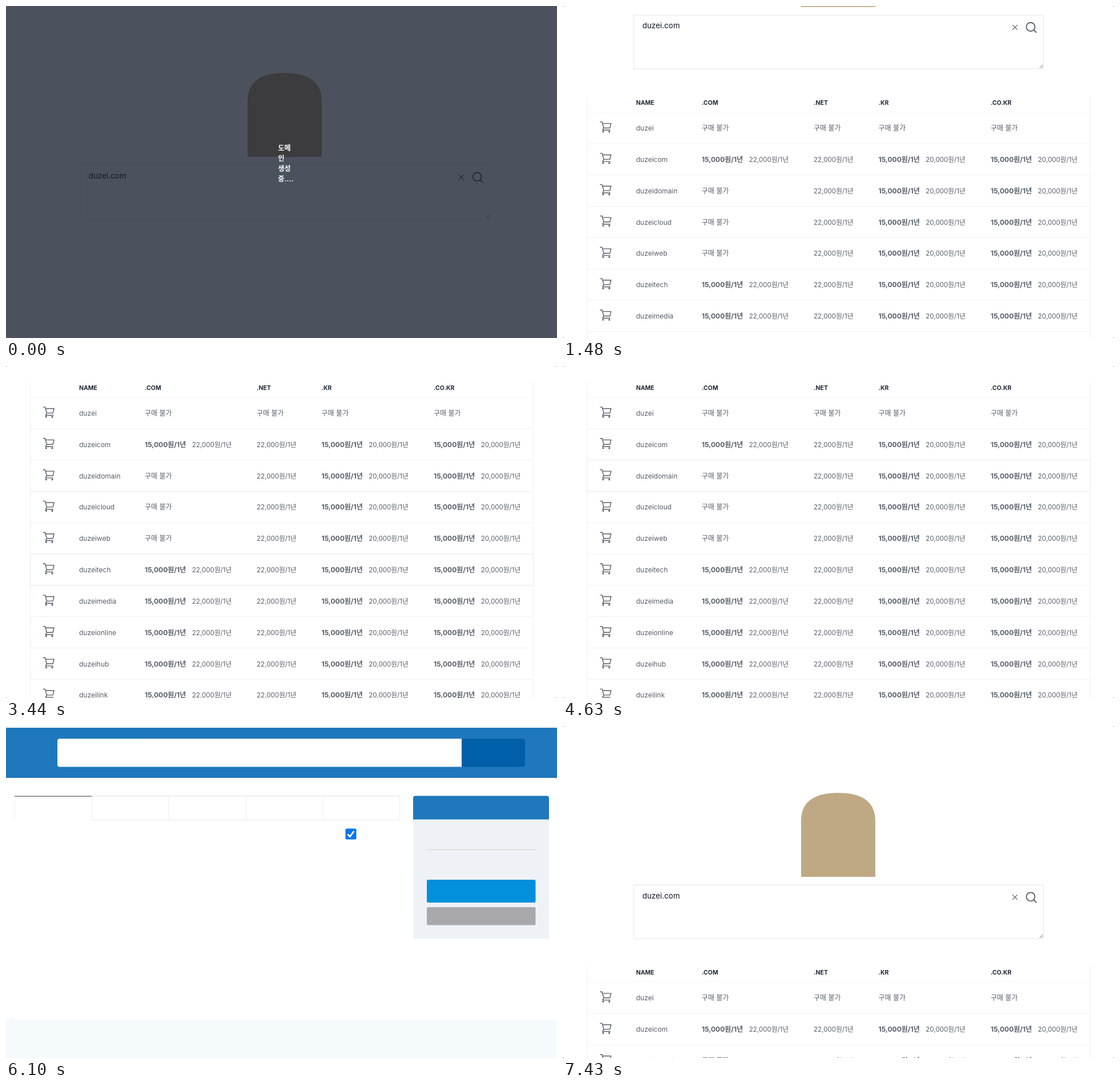
An HTML page that plays this animation: 965 by 581 pixels, repeating every 8 s.

```html
<!DOCTYPE html>
<html lang="ko">
<head>
<meta charset="utf-8">
<style>
  html, body { margin: 0; width: 100%; height: 100%; overflow: hidden; background: #333; }
  svg { display: block; width: 965px; height: 581px; }
  text { font: 12px Inter, "Noto Sans CJK KR", "Noto Sans CJK", sans-serif; fill: #585e6a; white-space: pre; }
  .price { font-size: 11.6px; }
  .sale { font-weight: 700; }
  .head { font-size: 10.5px; font-weight: 700; fill: #1f2937; }
  .query { font-size: 13.4px; fill: #111827; }
  .wait { font-weight: 700; fill: #fff; }
  .icon { fill: none; stroke: #565c68; stroke-linecap: round; stroke-linejoin: round; }
  .rule { fill: none; stroke: #eff0f2; }
</style>
</head>
<body>
<svg viewBox="0 0 965 581">
  <defs>
    <clipPath id="window"><rect width="965" height="581" rx="2"/></clipPath>
    <g id="cart" class="icon" stroke-width="1.4">
      <path d="M0 1H3.2L6 11.5L4 15.3H17.2M3.8 3.6H18.8L16.8 11.5H6"/>
      <circle cx="5" cy="18" r=".9"/><circle cx="15.7" cy="18" r=".9"/>
    </g>
  </defs>
  <g clip-path="url(#window)">
    <rect width="965" height="581" fill="#fff"/>

    <g id="finder">
      <path d="M417 264V166Q417 117 482 117T547 166V264Z" fill="#bfa985"/>
      <rect x="124" y="278.3" width="717.5" height="94" fill="#fff" stroke="#e5e7eb"/>
      <text class="query" x="139" y="301.5">duzei.com</text>
      <g class="icon">
        <path stroke-width="1.2" d="M787.5 295.7l8 8m0-8l-8 8"/>
        <circle stroke-width="1.8" cx="819" cy="298.8" r="7.5"/>
        <path stroke-width="1.8" d="M824.5 304.3l4.2 4.2"/>
        <path stroke-width=".9" d="M835 370.6l5-5M838 370.6l2-2"/>
      </g>
      <g id="table">
        <path class="rule" d="M42.5 421V1000M923.5 421V1000"/>
        <path class="rule" d="M42 448.3H924" opacity=".5"/>
        <rect id="hover" x="42.5" width="881" height="54.8" fill="none" stroke="#e8eaee"/>
      </g>
    </g>

    <g id="loading">
      <rect width="965" height="581" fill="#111827" opacity=".75"/>
      <text class="wait" x="476.5" y="252.5">도메<tspan x="476.5" dy="18">인</tspan><tspan x="476.5" dy="18">생성</tspan><tspan x="476.5" dy="18">중....</tspan></text>
    </g>

    <g id="shop">
      <rect width="965" height="581" fill="#fff"/>
      <rect y="3" width="965" height="87.5" fill="#1f78bc"/>
      <path d="M0 90H965" stroke="#1b659f"/>
      <rect x="780" y="22.3" width="129" height="49.2" rx="4" fill="#005fa8"/>
      <path d="M94 22.3H798V71.5H94Q90 71.5 90 67.5V26.3Q90 22.3 94 22.3Z" fill="#fff"/>
      <path d="M150 122.8H689.5" stroke="#dcdcdc"/>
      <path d="M15 123V164.5M150 123V164.5H689.5V123M285 123V164.5M420 123V164.5M555 123V164.5" fill="none" stroke="#ececec"/>
      <path d="M15 122.8H150" stroke="#5c5c62" stroke-width="1.3"/>
      <rect x="594.5" y="179.5" width="19" height="19" rx="2" fill="#0b76ef"/>
      <path d="M598.5 189.5l3.8 4 7-9.5" fill="none" stroke="#fff" stroke-width="2.8"/>
      <rect x="713" y="122.3" width="238" height="60" rx="4" fill="#1f78bc"/>
      <rect x="713" y="163.5" width="238" height="208.5" fill="#eef2f6"/>
      <path d="M736.5 216.3H927.5" stroke="#ccd0d3"/>
      <rect x="737" y="269" width="190.5" height="40" rx="2.5" fill="#0290dc"/>
      <rect x="737" y="317" width="190.5" height="31.5" rx="2.5" fill="#a9a9ab"/>
      <path d="M0 511.5H13V514.3H965V581H0Z" fill="#f5fafd"/>
    </g>
  </g>
</svg>
<script>
  const LOOP = 8000, STEP = 70, ROW_TOP = 448.3, ROW_H = 54.83;
  const BRAND = 'duzei';
  const SUFFIXES = ['', 'com', 'domain', 'cloud', 'web', 'tech', 'media', 'online', 'hub', 'link'];
  const COM_TAKEN = ['domain', 'cloud', 'web'];
  const COLUMNS = [
    { label: '.COM', x: 243, sale: '15,000', price: '22,000' },
    { label: '.NET', x: 439, price: '22,000' },
    { label: '.KR', x: 552.5, sale: '15,000', price: '20,000' },
    { label: '.CO.KR', x: 749, sale: '15,000', price: '20,000' }
  ];
  // start, steps, scroll from, scroll to, easing power
  const SCROLLS = [
    [1130, 6, 0, 262.3, 4],
    [2880, 4, 262.3, 393.4, 2],
    [7220, 4, 393.4, 0, 2]
  ];

  const $ = id => document.getElementById(id);
  const table = $('table');

  function add(tag, attrs, text = '') {
    const el = document.createElementNS('http://www.w3.org/2000/svg', tag);
    for (const key in attrs) el.setAttribute(key, attrs[key]);
    el.textContent = text;
    table.append(el);
  }
  const label = (x, y, text, cls = '') => add('text', { x, y, class: cls }, text);
  const perYear = amount => amount + '원/1년';

  function buildTable() {
    label(128, 435.2, 'NAME', 'head');
    COLUMNS.forEach(col => label(col.x, 435.2, col.label, 'head'));
    SUFFIXES.forEach((suffix, i) => {
      const top = ROW_TOP + i * ROW_H, base = top + 32.1;
      add('path', { class: 'rule', d: `M42 ${top + ROW_H}H924` });
      add('use', { href: '#cart', x: 65.3, y: top + 16 });
      label(128, base, BRAND + suffix);
      COLUMNS.forEach((col, c) => {
        const taken = !suffix || (c === 0 && COM_TAKEN.includes(suffix));
        if (taken) return label(col.x, base, '구매 불가');
        if (col.sale) label(col.x, base, perYear(col.sale), 'sale');
        label(col.x + (col.sale ? 82.8 : 0), base, perYear(col.price), 'price');
      });
    });
  }

  function ease(p, power) {
    return p < .5 ? .5 * (2 * p) ** power : 1 - .5 * (2 - 2 * p) ** power;
  }

  function scrollAt(t) {
    let y = 0;
    for (const [start, steps, from, to, power] of SCROLLS) {
      if (t < start) break;
      const p = Math.min(1, (Math.floor((t - start) / STEP) + 1) / steps);
      y = from + (to - from) * ease(p, power);
    }
    return y;
  }

  const show = (id, on) => $(id).style.display = on ? '' : 'none';

  function render(t) {
    const waiting = t < 500;
    $('finder').setAttribute('transform', `translate(${waiting ? 6 : 0} ${-scrollAt(t)})`);
    show('table', !waiting);
    show('loading', t < 570);
    $('loading').setAttribute('opacity', waiting ? 1 : .4);
    show('shop', t >= 5330 && t < 6660);
    show('hover', t >= 3090 && t < 7220);
    $('hover').setAttribute('y', ROW_TOP + ROW_H * (t < 4630 ? 5 : 2));
  }

  const began = performance.now();
  function tick() {
    render((performance.now() - began) % LOOP);
    requestAnimationFrame(tick);
  }
  buildTable();
  render(0);
  requestAnimationFrame(tick);
</script>
</body>
</html>
```
